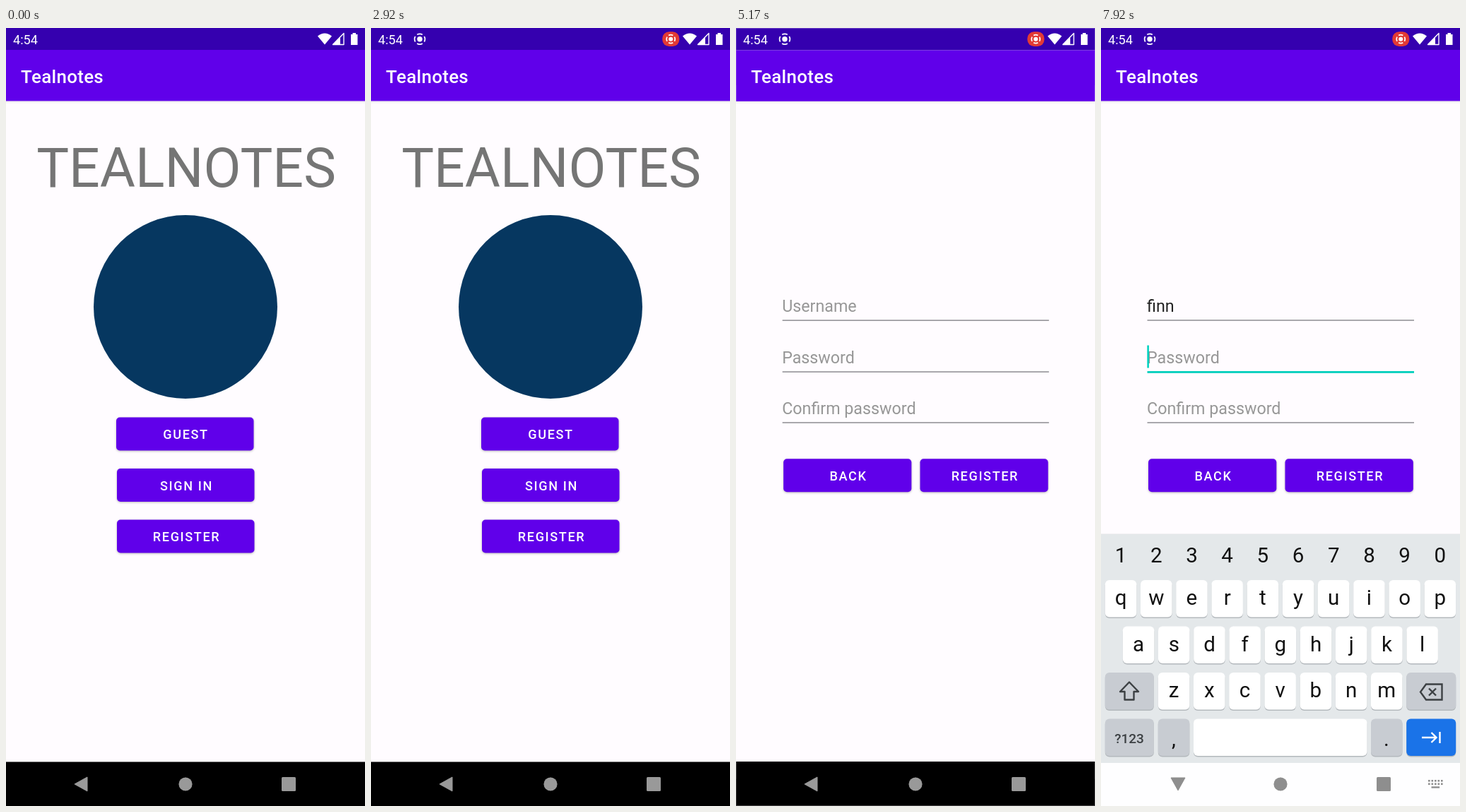
Write an HTML page that moves like this. It is 508 by 1102 pixels and loops after 8000 ms.

```html
<!DOCTYPE html>
<html lang="en">
<head>
<meta charset="utf-8">
<title>App sign-up</title>
<style>
  html, body { margin: 0; width: 100%; height: 100%; overflow: hidden; background: #fffcff; }
  svg { display: block; width: 508px; height: 1102px; font-family: Roboto, sans-serif; }
  .btn > rect:first-child { fill: #6000ea; filter: drop-shadow(0 1.5px 1.5px rgba(0, 0, 0, .28)); }
  .btn text { font-size: 18.1px; font-weight: 500; letter-spacing: 1.62px; fill: #fff; text-anchor: middle; }
  .field text { font-size: 23.28px; }
  .key { font-size: 29.5px; fill: #111; text-anchor: middle; }
  .line { fill: none; stroke: #3c4043; stroke-width: 2.4; }
  .white { stroke: #fff; }
</style>
</head>
<body>
<svg id="stage" viewBox="0 0 508 1102"></svg>
<script>
const LOOP = 8000, STEP = 250 / 3;
const APP = 'Tealnotes', USER = 'finn';
const TYPED = [6410, 6660, 6910, 7160];
const RECORD = 160, TAP = 4690, OPEN = 4851, FOCUS = 5660, SLIDE = 5700, NEXT = 7490, SWITCH = 7660;

// ---- markup helpers
const rect = (x, y, w, h, fill, more = '') =>
  `<rect x="${x}" y="${y}" width="${w}" height="${h}" fill="${fill}" ${more}/>`;
const circle = (x, y, r, fill, more = '') =>
  `<circle cx="${x}" cy="${y}" r="${r}" fill="${fill}" ${more}/>`;
const text = (x, y, s, more = '') => `<text x="${x}" y="${y}" ${more}>${s}</text>`;
const path = (d, more = '') => `<path d="${d}" ${more}/>`;
const group = (id, body, more = '') => `<g id="${id}" ${more}>${body}</g>`;

const screen = (id, body) => group(id,
  rect(0, 0, 508, 1102, '#fffcff') +
  rect(0, 103, 508, 2, '#000', 'opacity=".07"') +
  rect(0, 105, 508, 2, '#000', 'opacity=".02"') +
  rect(0, 0, 508, 31, '#3500af') + rect(0, 31, 508, 72.4, '#6000ea') +
  text(21, 78, APP, 'font-size="25.9" font-weight="500" letter-spacing=".32" fill="#fff"') +
  body + rect(0, 1039.5, 508, 62.5, '#000'));

const button = (x, y, w, label, extra = '') =>
  `<g class="btn">${rect(x, y, w, 47, '#6000ea', 'rx="5"')}${extra}` +
  text(x + w / 2 + 1.3, y + 30.6, label) + '</g>';

const field = (id, y, hint) => `<g class="field">` +
  text(65, y - 12, hint, `id="${id}Text" fill="#979797"`) +
  rect(65.5, y - .7, 377.5, 1.4, '#85858a', `id="${id}Line"`) + '</g>';

// ---- keyboard
const PITCH = 50.2, KEY_W = 44.5, ROWS = [782, 847.5, 913, 978.5];
const cap = (x, y, w, fill = '#fff') =>
  rect(x, y + 1.5, w, 52.5, '#b4b9bd', 'rx="6"') + rect(x, y, w, 52.5, fill, 'rx="6"');
const letters = (s, x0, y) => [...s].map((c, i) => {
  const x = x0 + i * PITCH;
  return cap(x, y, KEY_W) + text(x + KEY_W / 2, y + 35, c, 'class="key"');
}).join('');
const digits = (dx, y, more) => [...'1234567890'].map((c, i) =>
  text(5.8 + i * PITCH + KEY_W / 2 + dx, y, c, more)).join('');

function keyboard() {
  const [r1, r2, r3, r4] = ROWS, GREY = '#c8ccd2';
  const common =
    letters('qwertyuiop', 5.8, r1) + letters('asdfghjkl', 30.8, r2) + letters('zxcvbnm', 80.8, r3) +
    cap(5.8, r3, 69, GREY) + cap(432.2, r3, 70, GREY) +
    cap(5.8, r4, 69, GREY) + cap(80.8, r4, KEY_W, GREY) +
    cap(382, r4, KEY_W, GREY) + cap(432.2, r4, 70, '#1a73e8') +
    path('M40 926.5L53 940H46.5V951.5H33.5V940H27Z', 'class="line" stroke-linejoin="round"') +
    path('M460 929.5H482.5V951.5H460L452 940.5ZM464 935.5L474 945.5M474 935.5L464 945.5', 'class="line"') +
    text(40, r4 + 34, '?123', 'font-size="19" font-weight="500" fill="#3c4043" text-anchor="middle"') +
    text(103, r4 + 38, ',', 'class="key"') + text(404, r4 + 38, '.', 'class="key"');
  const plain =
    circle(32.5, 747, 19.7, '#b9bec2') + circle(32.5, 746, 19.5, '#fff') +
    path('M29 739L36 746L29 753', 'class="line"') +
    text(252, 753.5, 'Tap to enable contact suggestions.', 'font-size="20.6" fill="#1a70dc" text-anchor="middle"') +
    rect(478, 733, 8, 16, '#3c4043', 'rx="4"') +
    path('M473 744.5C473 756 491 756 491 744.5M482 753V758.5', 'class="line"') +
    digits(15.5, 797, 'font-size="13" font-weight="500" fill="#55595d" text-anchor="middle"') +
    cap(131, r4, KEY_W) + cap(181, r4, 195.5) +
    circle(153, 1005, 11.5, 'none', 'class="line"') +
    circle(149, 1002, 1.8, '#3c4043') + circle(157, 1002, 1.8, '#3c4043') +
    path('M147 1007.5Q153 1015 159 1007.5', 'class="line"') +
    path('M479 999V1006H457M462 1000.5L456.5 1006L462 1011.5', 'class="line white"');
  const secret =
    digits(0, 757, 'class="key"') + cap(131, r4, 245.5) +
    path('M454 1005H474M467.5 998L474.5 1005L467.5 1012M479.5 997V1013', 'class="line white"');
  return rect(0, 717, 508, 324, '#e4e8ea') + rect(0, 716, 508, 1, '#000', 'opacity=".05"') +
    rect(0, 1041, 508, 61, '#fefeff') + common + group('plain', plain) + group('secret', secret);
}

// ---- system icons
const target = (x, r, color) =>
  circle(x, 15.7, r * .5, color) +
  circle(x, 15.7, r, 'none', `stroke="${color}" stroke-width="1.7" pathLength="80" stroke-dasharray="14 6" stroke-dashoffset="7"`);

const dots = [0, 1, 2, 3, 4].map(i =>
  rect(463 + i * 4.5, 1065, 2.6, 2.6, 'currentColor') +
  rect(463 + i * 4.5, 1069.5, 2.6, 2.6, 'currentColor')).join('');

const system =
  text(10, 22.7, '4:54', 'font-size="18.1" fill="#fff"') +
  group('record', target(69, 7.4, '#fff') +
    rect(412.3, 5.3, 24, 20.7, '#e23a35', 'rx="9.5"') + target(424.2, 6, '#fff')) +
  path('M441 11.5Q451 3.5 461 11.5L451 23.5Z', 'fill="#fff"') +
  path('M478 7.5V23.5H462.5Z', 'fill="none" stroke="#fff" stroke-width="1.4" stroke-linejoin="round"') +
  path('M473 12.5V23.5H462.5Z', 'fill="#fff"') +
  path('M490.5 9V7H495V9H497.5V24H488V9Z', 'fill="#fff"') +
  group('nav',
    path('M97 1071L115 1061V1081Z', 'id="back" fill="currentColor" stroke="currentColor" stroke-linejoin="round"') +
    circle(254, 1071, 9.6, 'currentColor') + rect(390, 1061, 20, 20, 'currentColor', 'rx="1.5"') +
    group('picker', dots + rect(467.5, 1074.3, 11.6, 2.4, 'currentColor')));

const stage = document.getElementById('stage');
stage.innerHTML =
  `<clipPath id="clip">${rect(157, 696.5, 194, 47, '#000', 'rx="5"')}</clipPath>` +
  screen('home',
    text(255, 225, APP.toUpperCase(), 'font-size="77" fill="#757575" text-anchor="middle"') +
    circle(254, 395, 130, '#063760') +
    button(156, 551.5, 194.5, 'GUEST') + button(157, 624, 194.5, 'SIGN IN') +
    button(157, 696.5, 194.5, 'REGISTER', circle(254, 720, 0, '#fff', 'id="ripple" clip-path="url(#clip)"'))) +
  screen('form',
    field('user', 414, 'Username') + field('pass', 487, 'Password') + field('again', 559, 'Confirm password') +
    rect(65.3, 377, 2.6, 32, '#03d3c0', 'id="caret"') +
    button(67, 610.3, 181.3, 'BACK') + button(260.5, 610.3, 181.3, 'REGISTER')) +
  group('ime', keyboard()) + system;

const el = {};
stage.querySelectorAll('[id]').forEach(e => el[e.id] = e);

// ---- motion
const clamp = v => Math.max(0, Math.min(1, v));
const span = (t, from, length) => clamp((t - from) / length);
const smooth = u => u * u * (3 - 2 * u);
const cubic = ([a, b, c, d], u) => {
  const v = 1 - u;
  return a * v * v * v + 3 * b * v * v * u + 3 * c * v * u * u + d * u * u * u;
};
function curve(x, xs, ys) {
  let lo = 0, hi = 1;
  for (let i = 0; i < 30; i++) {
    const mid = (lo + hi) / 2;
    if (cubic(xs, mid) < x) lo = mid; else hi = mid;
  }
  return cubic(ys, lo);
}
const fastOut = x => x < 1 / 6
  ? curve(x, [0, .05, .13333, .16667], [0, 0, .06, .4])
  : curve(x, [.16667, .20833, .25, 1], [.4, .82, 1, 1]);

const show = (e, on) => e.setAttribute('display', on ? 'inline' : 'none');
const set = (e, attrs) => { for (const k in attrs) e.setAttribute(k, attrs[k]); };
const zoom = s => `translate(254 551) scale(${s}) translate(-254 -551)`;

function focusLine(line, y, on) {
  const h = on ? 2.8 : 1.4;
  set(line, { y: y - h / 2 + (on ? .4 : 0), height: h, fill: on ? '#03cfbc' : '#85858a' });
}

function draw(t) {
  show(el.record, t >= RECORD);

  set(el.ripple, { r: t < TAP ? 0 : 30 + 80 * span(t, TAP, 200), opacity: .18 * span(t, TAP, 75) });

  const p = fastOut(span(t, OPEN, 400)), alpha = span(t, OPEN + 49, 50);
  set(el.home, { transform: zoom(1 + .05 * p) });
  set(el.form, { transform: zoom(.85 + .15 * p), opacity: alpha });
  show(el.home, p < 1);
  show(el.form, alpha > 0);

  const onUser = t >= FOCUS && t < NEXT, onPass = t >= NEXT;
  const count = TYPED.filter(k => t >= k).length;
  el.userText.textContent = count ? USER.slice(0, count) : 'Username';
  el.userText.setAttribute('fill', count ? '#222' : '#979797');
  focusLine(el.userLine, 414, onUser);
  focusLine(el.passLine, 487, onPass);

  const since = onPass ? NEXT : count ? TYPED[count - 1] : FOCUS;
  show(el.caret, t >= FOCUS && (t - since) % 1000 < 500);
  const shift = onUser && count ? el.userText.getComputedTextLength() : 0;
  set(el.caret, { x: 65.3 + shift, y: onPass ? 449.5 : 377 });

  const left = Math.pow(1 - span(t, SLIDE, 380), 2.58);
  show(el.ime, t >= SLIDE);
  set(el.ime, { transform: `translate(0 ${385 * left})` });
  show(el.plain, t < SWITCH);
  show(el.secret, t >= SWITCH);

  const grey = Math.round(153 + 52 * span(t, 5850, 150) - 63 * span(t, 6000, 250));
  el.nav.style.color = `rgb(${grey},${grey},${grey})`;
  set(el.back, { transform: `rotate(${-90 * smooth(span(t, 5920, 270))} 107.5 1069.5)` });
  set(el.picker, { opacity: span(t, 5860, 200) });
}

const start = performance.now();
function tick() {
  const t = (performance.now() - start) % LOOP;
  draw(Math.floor((t + 4) / STEP) % 96 * STEP);
  requestAnimationFrame(tick);
}
tick();
</script>
</body>
</html>
```
